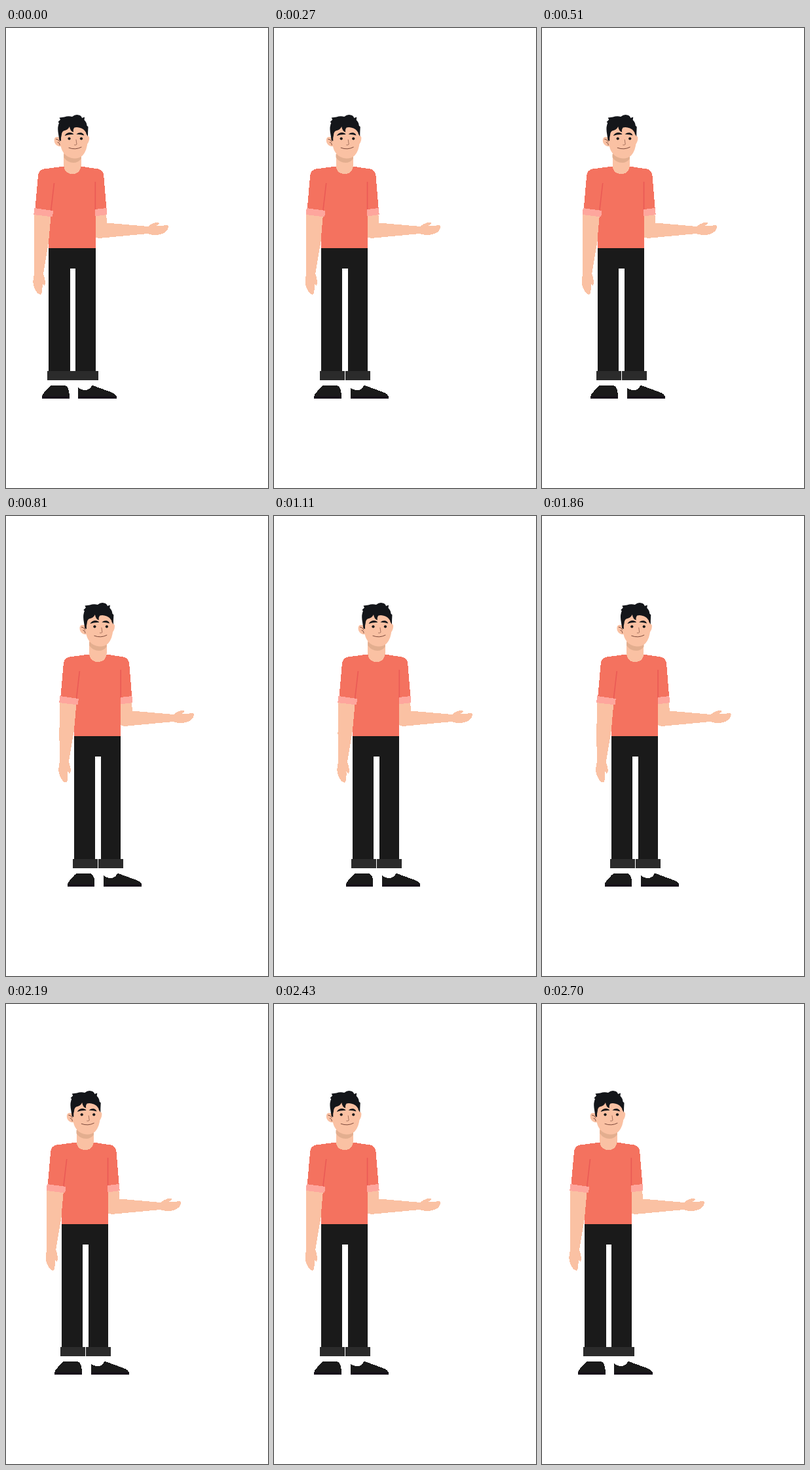
Animation, 400 px wide and 700 px high, one loop 2.73 s. Source, as an HTML page:

```html
<!DOCTYPE html>
<html lang="en">
<head>
<meta charset="utf-8">
<title>Presenting man</title>
<style>
  @property --step { syntax: "<number>"; inherits: false; initial-value: 0; }
  html, body { margin: 0; width: 100%; height: 100%; overflow: hidden; background: #fff; }
  svg { display: block; width: 400px; height: 700px; }

  /* 91 steps of 30 ms; smoothstep 60px to the right and back */
  .man {
    --u: calc(min(var(--step), 90 - var(--step)) / 45);
    transform: translateX(calc(60px * var(--u) * var(--u) * (3 - 2 * var(--u))));
    animation: sway 2730ms steps(91) -1ms infinite;
  }
  @keyframes sway { from { --step: 0; } to { --step: 91; } }

  .crisp { shape-rendering: crispEdges; }
  .skin { fill: #fac1a3; }
  .shade { fill: #e3ae8f; }
  .shirt { fill: #f4725f; }
  .fold { fill: none; stroke: #ea5a55; stroke-width: 1.6; shape-rendering: auto; }
  .cuff { fill: #fea69d; }
  .black { fill: #1a1a1a; }
  .hem { fill: #2b2b2b; }
  .sole { fill: #17121a; }
  .hair { fill: #14161a; }
  .line { fill: none; stroke: #7d4a3b; stroke-width: 1; stroke-linecap: round; }
</style>
</head>
<body>
<svg viewBox="0 0 400 700">
  <g class="man">
    <g class="crisp">
      <!-- shoes -->
      <path class="black" d="M55.200 561Q55 558 58 555L66 546Q68 544 71 544H89Q92 544 94 547Q96 551 96.510 556V561Z"/>
      <path class="sole" d="M55.200 560H96.510V564H55.200Z"/>
      <path class="black" d="M110.300 561V547Q114 551 121 551Q128 551 131 544Q134 544 138 546L160 554Q168 557 168.510 561Z"/>
      <path class="sole" d="M110.300 560H168.510V564H110.300Z"/>

      <!-- trousers -->
      <path class="black" d="M65.350 334H136.510V523H106.400V366H97.510V523H65.350Z"/>
      <path class="hem" d="M63.350 522H101.510V536H63.350ZM102.400 522H140.510V536H102.400Z"/>

      <!-- arms -->
      <path class="skin" d="M43.300 282L70 284L66.500 318L63 338L57 374Q59 380 60 386Q60 391 58 392L55.500 389Q56 399 54 405Q51 407 47 402Q41.500 394 41.300 386Q42 379 43 374L42.500 330Z"/>
      <path class="skin" d="M136 283L153 281L154 296.500L217 302Q221 298 227 296.500Q233 295 234 297Q233 299 230 300.500Q240 301 247 300Q249 303 246 308Q241 314 230 315Q222 315 216 313L146 319.600Q140 320.500 136 318Z"/>

      <!-- shirt -->
      <path class="shirt" d="M88 210.500L58 214.500Q50 216 49 224L44.300 277L69 281L65.350 322V335H136.510V278L153.500 276L149.300 225Q148.500 216 140.500 214.500L114 210.500Z"/>
      <path class="fold" d="M73.500 236L68.500 279M136.300 234V277"/>
      <path class="cuff" d="M43.500 274L72 278L71 287.500L42.300 284ZM136 276L153.500 274L154.510 284L136 286.500Z"/>

      <!-- neck -->
      <path class="skin" d="M88.300 188H114.700V210Q113 222 101.500 222Q90 222 88.300 210Z"/>
    </g>
    <path class="shade" d="M88.300 192H114.700V199Q110 205 103 205Q94 205 88.300 197Z"/>

    <!-- head -->
    <path class="skin" d="M84 168Q80 165 76 166Q72.500 168 74 174Q77 181 84 180Z"/>
    <path class="skin" d="M121 165Q126 162 127.200 167Q127.200 175 121 180Z"/>
    <path class="skin" d="M82 150H124.500V172Q124 186 117 194Q111 199 104 198.500Q94 198 88 190Q84 185 83 176Z"/>
    <path class="line" d="M76.500 169Q80 169 82 173M79 174Q82 174 82 178"/>
    <path class="hair" d="M81.500 171L79.500 158Q78.500 150 81 144.500L79.500 143L83 139.500L81.500 136.500L89 135.500Q95 133.500 101 135Q106 131 111 132.500Q115 133 116 137L120 135.500L119.500 140Q123.500 144 123.500 148.500L125.500 150.500Q125 158 125 165L122.500 161Q122 156 115 152.500Q109 150 104.500 151.500Q102 154 103 158.500Q98 157 97 150Q95 155 88 156.500Q85 158 84.800 163Q83.500 167 84 172Z"/>

    <!-- face -->
    <path class="hair" d="M89.500 164Q92 159.500 97 159Q102 159.300 103.300 162Q96 161.500 89.500 164ZM107.300 161.700Q111 158.700 115.500 159.500Q118.500 160.500 119.300 163.500Q114 161.500 107.300 161.700Z"/>
    <g class="black">
      <circle cx="96.500" cy="168.300" r="2.100"/>
      <circle cx="115" cy="168.300" r="2.100"/>
    </g>
    <path class="line" d="M107 170L108 177Q107 178.500 104.500 178" stroke-opacity=".65"/>
    <path class="line" d="M96 182.300Q106 186 115 181.300"/>
  </g>
</svg>
</body>
</html>
```
